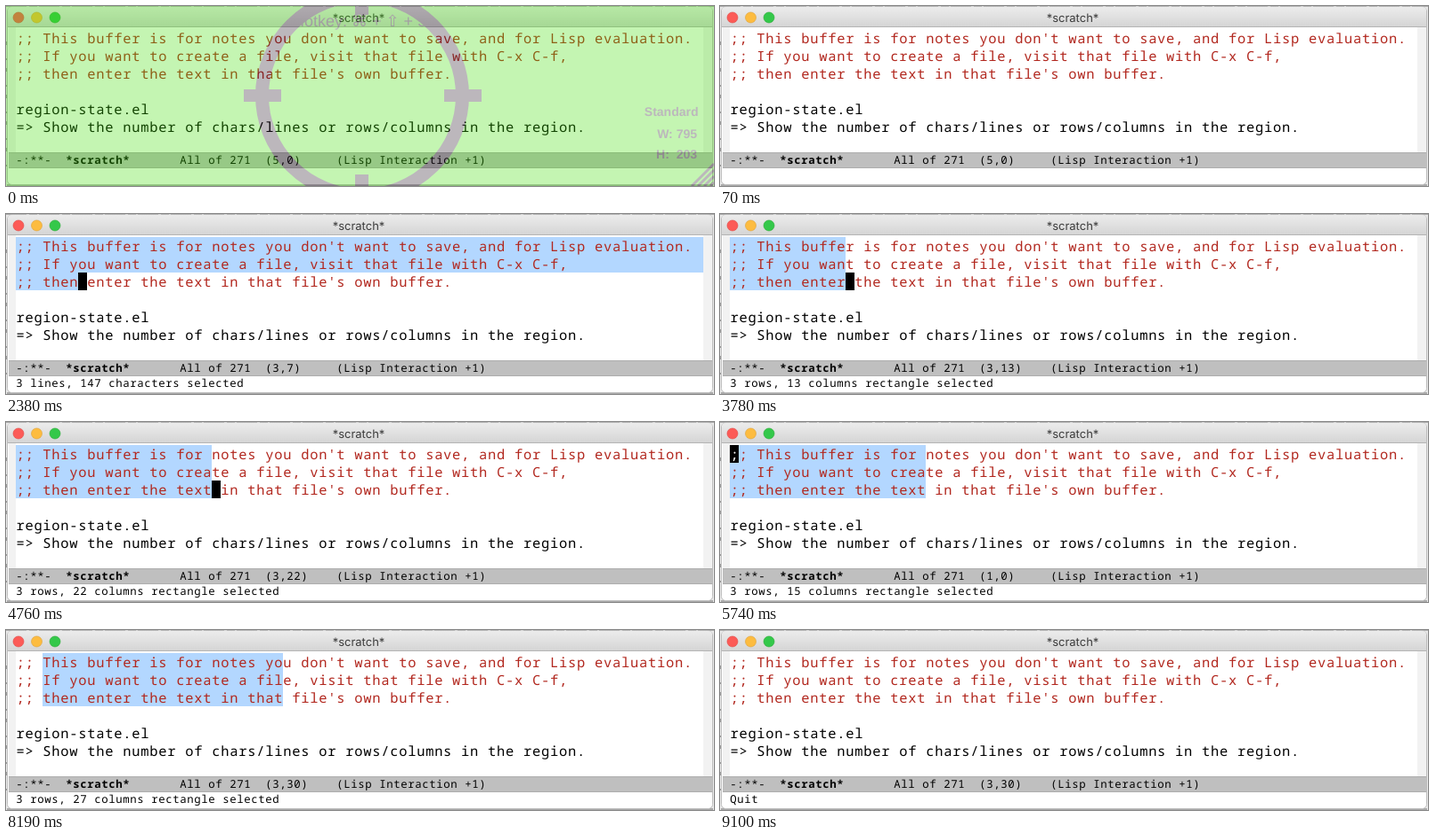
An HTML page for the animation above (9380 ms loop, 795 by 203 pixels).

```html
<!DOCTYPE html>
<html lang="en">
<head>
<meta charset="utf-8">
<title>*scratch*</title>
<style>
html, body { margin: 0; width: 100%; height: 100%; overflow: hidden; background: #e8e8e8; }
svg { display: block; width: 795px; height: 203px; }
text { white-space: pre; text-rendering: geometricPrecision; }
.code { font: 15.4px "Noto Sans Mono", monospace; letter-spacing: .76px; }
.small { font: 12.3px "Noto Sans Mono", monospace; letter-spacing: .62px; }
.bold { font-weight: bold; }
.title { font: 13px Inter, sans-serif; fill: #3c3c3c; }
.label { font: bold 14px "Liberation Sans", Arial, sans-serif; }
.hotkey { font: 18px "Liberation Sans", "DejaVu Sans", sans-serif; }
</style>
</head>
<body>
<svg viewBox="0 0 795 203" xmlns="http://www.w3.org/2000/svg">
  <defs>
    <linearGradient id="bar" x2="0" y2="1">
      <stop offset="0" stop-color="#ececec"/>
      <stop offset="1" stop-color="#d4d4d4"/>
    </linearGradient>
  </defs>

  <rect width="795" height="203" fill="#e8e8e8"/>
  <path d="M0 .5H795" stroke="#aaa" stroke-dasharray="23 3 9 2"/>
  <path d="M.5 40V190" stroke="#999" stroke-dasharray="4 15 2 9"/>
  <path d="M1 202H794" stroke="#a9a9a9" stroke-width="2"/>

  <rect x="1.5" y="1" width="792" height="200.5" rx="5" fill="#fff" stroke="#bdbdbd"/>
  <path d="M2 24V6q0-5 5-5H788q5 0 5 5V24z" fill="url(#bar)"/>
  <path d="M2 23.5H793" stroke="#b4b4b4"/>
  <circle cx="14" cy="13" r="6" fill="#fc5b57" stroke="#df4744" stroke-width=".6"/>
  <circle cx="34.5" cy="13" r="6" fill="#fdbc40" stroke="#de9f34" stroke-width=".6"/>
  <circle cx="55" cy="13" r="6" fill="#34c84a" stroke="#27aa35" stroke-width=".6"/>
  <text class="title" x="396" y="18" text-anchor="middle">*scratch*</text>

  <path d="M3 24h8v141h-8zM783 24h10v141h-10z" fill="#f2f2f2"/>
  <rect x="3" y="165" width="790" height="18" fill="#bfbfbf"/>
  <path d="M3 165.5H793M3 182.5H793" stroke="#adadad"/>

  <path id="region" fill="#b3d7ff"/>
  <g id="lines"></g>
  <rect id="cursor" width="10" height="20"/>
  <text id="under" class="code" fill="#fff"></text>

  <text class="small" x="11.3" y="178">-:**-</text>
  <text class="small bold" x="67.3" y="178">*scratch*</text>
  <text id="mode" class="small" x="195.3" y="178"></text>
  <text id="echo" class="small" x="11.3" y="195"></text>

  <g id="veil" opacity=".3" fill="#261526">
    <rect width="795" height="203" fill="#3ee105"/>
    <circle cx="400" cy="101" r="112.5" fill="none" stroke="#261526" stroke-width="15"/>
    <path d="M267 94h42v14h-42zM492 94h42v14h-42zM392 0h15v10h-15zM392 190h15v13h-15z"/>
    <text class="hotkey" x="322" y="23">Hotkey: ⌘ + ⇧ + 5</text>
    <g class="label" text-anchor="end">
      <text x="777.5" y="124">Standard</text>
      <text x="776" y="149">W: 795</text>
      <text x="776" y="172">H:  203</text>
    </g>
    <path d="M770 203L795 178M777 203L795 185M784 203L795 192M791 203L795 199" stroke="#261526" stroke-width="3"/>
  </g>
</svg>

<script>
const LOOP = 9380, LEFT = 11, RIGHT = 783, TOP = 26, CHAR = 10, ROW = 20;

const text = [
  ";; This buffer is for notes you don't want to save, and for Lisp evaluation.",
  ";; If you want to create a file, visit that file with C-x C-f,",
  ";; then enter the text in that file's own buffer.",
  "",
  "region-state.el",
  "=> Show the number of chars/lines or rows/columns in the region."
];

const chars = n => `3 lines, ${n} characters selected`;
const cols = n => `3 rows, ${n} columns rectangle selected`;

// Each step changes only the named parts of the editor's state.
// Points are [line, column]; the echo area may run ahead of the buffer.
const steps = [
  [0, { point: [5, 0], mark: null, rect: false, lit: false, echo: "", veil: true }],
  [70, { veil: false }],
  [560, { echo: "Mark set" }],
  [630, { point: [1, 0], lit: true }],
  [1540, { point: [2, 0], mark: [1, 0], echo: "" }],
  [1890, { point: [3, 0], echo: chars(140) }],
  [2380, { point: [3, 7], echo: chars(147) }],
  [2660, { point: [3, 13], echo: chars(153) }],
  [3150, { lit: false }],
  [3500, { echo: "C-x-" }],
  [3710, { echo: cols(13) }],
  [3780, { rect: true, lit: true }],
  [4270, { point: [3, 17], echo: cols(17) }],
  [4760, { point: [3, 22], echo: cols(22) }],
  [5250, { echo: "C-x-" }],
  [5390, { point: [1, 0], mark: [3, 22], echo: cols(22) }],
  [5740, { echo: cols(15) }],
  [5810, { point: [1, 7] }],
  [6020, { point: [1, 3], echo: cols(19) }],
  [6580, { lit: false }],
  [6790, { echo: "C-x-" }],
  [6930, { point: [3, 22], mark: [1, 3], lit: true, echo: cols(19) }],
  [7350, { echo: cols(22) }],
  [7420, { point: [3, 25] }],
  [7630, { point: [3, 30], echo: cols(27) }],
  [8190, { lit: false }],
  [8610, { mark: null, rect: false, lit: true, echo: "Quit" }],
  [9100, { lit: false }]
];

const el = id => document.getElementById(id);
const [region, lines, cursor, under, mode, echo, veil] =
  ["region", "lines", "cursor", "under", "mode", "echo", "veil"].map(el);

const xOf = col => LEFT + col * CHAR;
const yOf = line => TOP + (line - 1) * ROW;

function place(node, col, line, string) {
  node.setAttribute("x", xOf(col) + .4);
  node.setAttribute("y", yOf(line) + 16);
  node.textContent = string;
}

text.forEach((string, i) => {
  const node = document.createElementNS("http://www.w3.org/2000/svg", "text");
  node.setAttribute("class", "code");
  node.setAttribute("fill", i < 3 ? "#b2281f" : "#000");
  place(node, 0, i + 1, string);
  lines.append(node);
});

function regionPath({ point, mark, rect }) {
  if (!mark) return "";
  const [from, to] = point[0] < mark[0] ? [point, mark] : [mark, point];
  let path = "";
  for (let line = from[0]; line <= to[0]; line++) {
    const x1 = xOf(rect ? Math.min(from[1], to[1]) : line === from[0] ? from[1] : 0);
    const x2 = rect ? xOf(Math.max(from[1], to[1])) : line === to[0] ? xOf(to[1]) : RIGHT;
    path += `M${x1} ${yOf(line)}H${x2}v${ROW}H${x1}z`;
  }
  return path;
}

function draw(time) {
  const state = Object.assign({}, ...steps.filter(([at]) => at <= time).map(step => step[1]));
  const [line, col] = state.point;

  region.setAttribute("d", regionPath(state));
  cursor.setAttribute("x", xOf(col));
  cursor.setAttribute("y", yOf(line));
  cursor.style.display = under.style.display = state.lit ? "" : "none";
  place(under, col, line, text[line - 1][col] || "");
  mode.textContent = `All of 271  ${`(${line},${col})`.padEnd(10)}(Lisp Interaction +1)`;
  echo.textContent = state.echo;
  veil.style.display = state.veil ? "" : "none";
}

let start;
function tick(now) {
  start ??= now;
  draw((now - start) % LOOP);
  requestAnimationFrame(tick);
}
draw(0);
requestAnimationFrame(tick);
</script>
</body>
</html>
```
